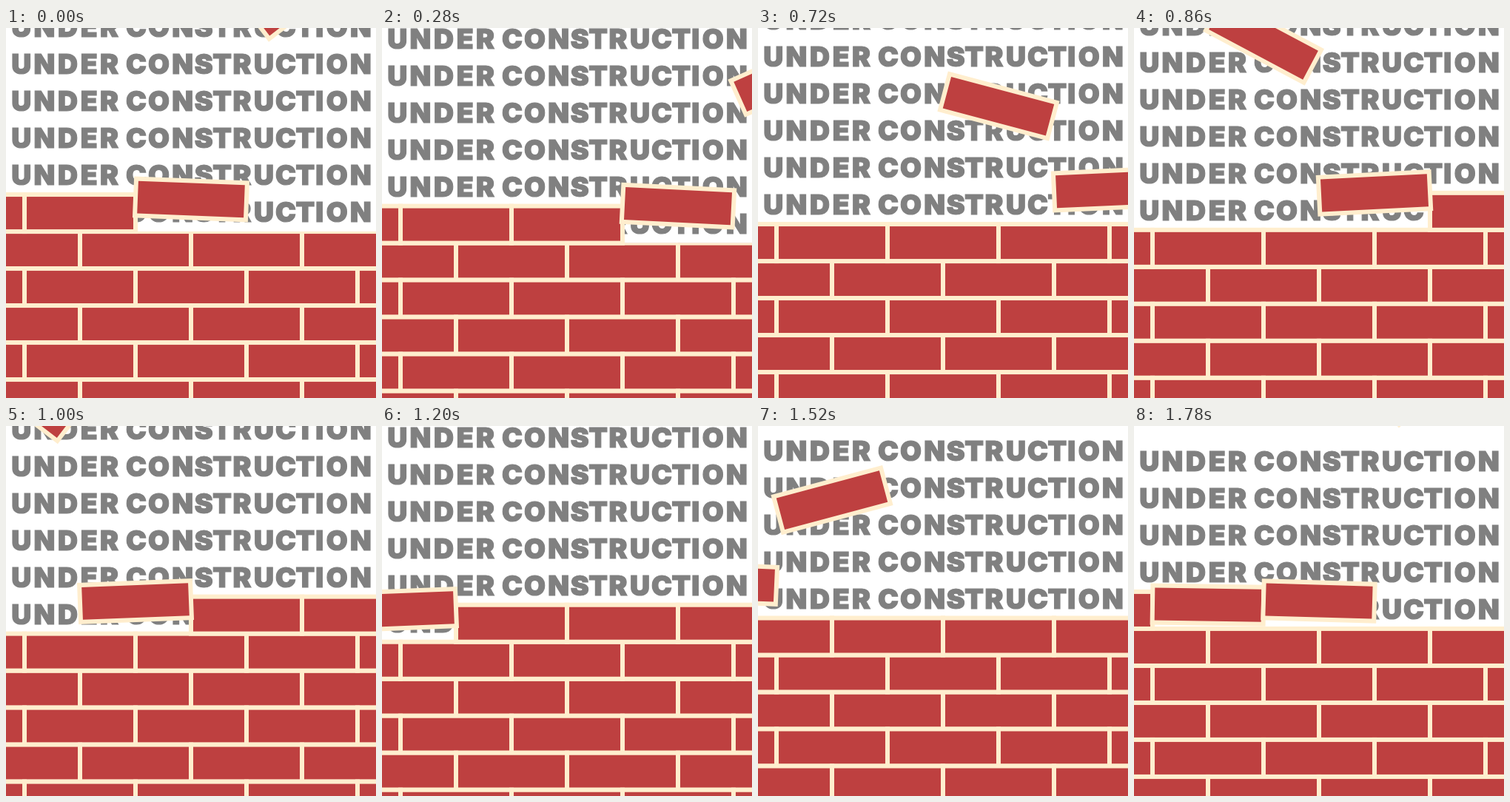
An HTML page that plays this animation: 500 by 500 pixels, repeating every 1800 ms.

```html
<!DOCTYPE html>
<html lang="en">
<head>
<meta charset="utf-8">
<title>Under construction</title>
<style>
  html, body { margin: 0; width: 100%; height: 100%; overflow: hidden; background: #fff; }
  svg { display: block; width: 100vw; height: 100vh; }
  text {
    font: 900 37.4px Inter, sans-serif; text-anchor: middle;
    fill: #808080; stroke: #808080; stroke-width: 1.2;
  }
  .brick { fill: #be4040; stroke: #ffeece; stroke-width: 6; }
</style>
</head>
<body>
<svg viewBox="0 0 500 500">
  <defs><clipPath id="below"><rect x="-10" y="275" width="520" height="300"/></clipPath></defs>
  <g id="scene">
    <g id="words"></g>
    <g id="wall" clip-path="url(#below)"></g>
    <g id="falling"></g>
  </g>
</svg>
<script>
const LOOP = 1800, RISE = 100, STAGGER = 200;
const BRICK_W = 150, BRICK_H = 50;
const $ = id => document.getElementById(id);

function add(parent, name, attrs, content = '') {
  const el = document.createElementNS('http://www.w3.org/2000/svg', name);
  for (const key in attrs) el.setAttribute(key, attrs[key]);
  el.textContent = content;
  return parent.appendChild(el);
}

// Rectangle centred on its own origin, so it turns about its middle
const addBrick = parent => add(parent, 'rect', {
  class: 'brick', x: -BRICK_W / 2, y: -BRICK_H / 2, width: BRICK_W, height: BRICK_H
});

const place = (el, x, y, turn = 0) =>
  el.setAttribute('transform', `translate(${x} ${y}) rotate(${turn})`);

// Seven lines of text with wide, evenly set capitals
const centres = '20.7 51.8 83.4 112.1 139.6 158 176 206.5 238.7 267.2 292 318.9 348.5 378 404.4 423.8 447.2 479.4';
for (let i = 0; i < 7; i++)
  add($('words'), 'text', { x: centres, y: -38 + 50 * i }, 'UNDER CONSTRUCTION');

// Finished wall
for (let row = 0; row < 5; row++) {
  const first = row % 2 ? -50 : 25;
  for (let i = 0; i < 4 + row % 2; i++)
    place(addBrick($('wall')), first + BRICK_W * i, 300 + BRICK_H * row);
}

// Three courses, laid alternately rightwards and leftwards
const bricks = [];
function layCourse(count, firstX, dir, y) {
  for (let i = 0; i < count; i++) {
    const start = bricks.length * STAGGER - 720;
    bricks.push({ el: addBrick($('falling')), x: firstX + dir * BRICK_W * i, y, dir, start });
  }
}
layCourse(5, -50, 1, 250);
layCourse(4, 475, -1, 200);
layCourse(5, -50, 1, 150);

const mix = (a, b, k) => a + (b - a) * k;
const clamp = k => Math.min(1, Math.max(0, k));

// Height above the resting place and tilt, by ms since the drop began
function drop(ms) {
  if (ms < 300) {
    const k = clamp(ms / 300) ** 2;
    return [mix(357, 12, k), mix(-45, 1.6, k)];
  }
  if (ms < 400) {
    const k = 1 - (1 - (ms - 300) / 100) ** 3;
    return [mix(12, 25, k), mix(1.6, 2.9, k)];
  }
  const k = clamp((ms - 400) / 120) ** 2;
  return [mix(25, 0, k), mix(2.9, 0, k)];
}

function draw() {
  const t = performance.now() % LOOP;
  place($('scene'), 0, RISE * t / LOOP);
  for (const b of bricks) {
    const [lift, tilt] = drop(t - b.start);
    place(b.el, b.x, b.y - lift, tilt * b.dir);
  }
  requestAnimationFrame(draw);
}
draw();
</script>
</body>
</html>
```
